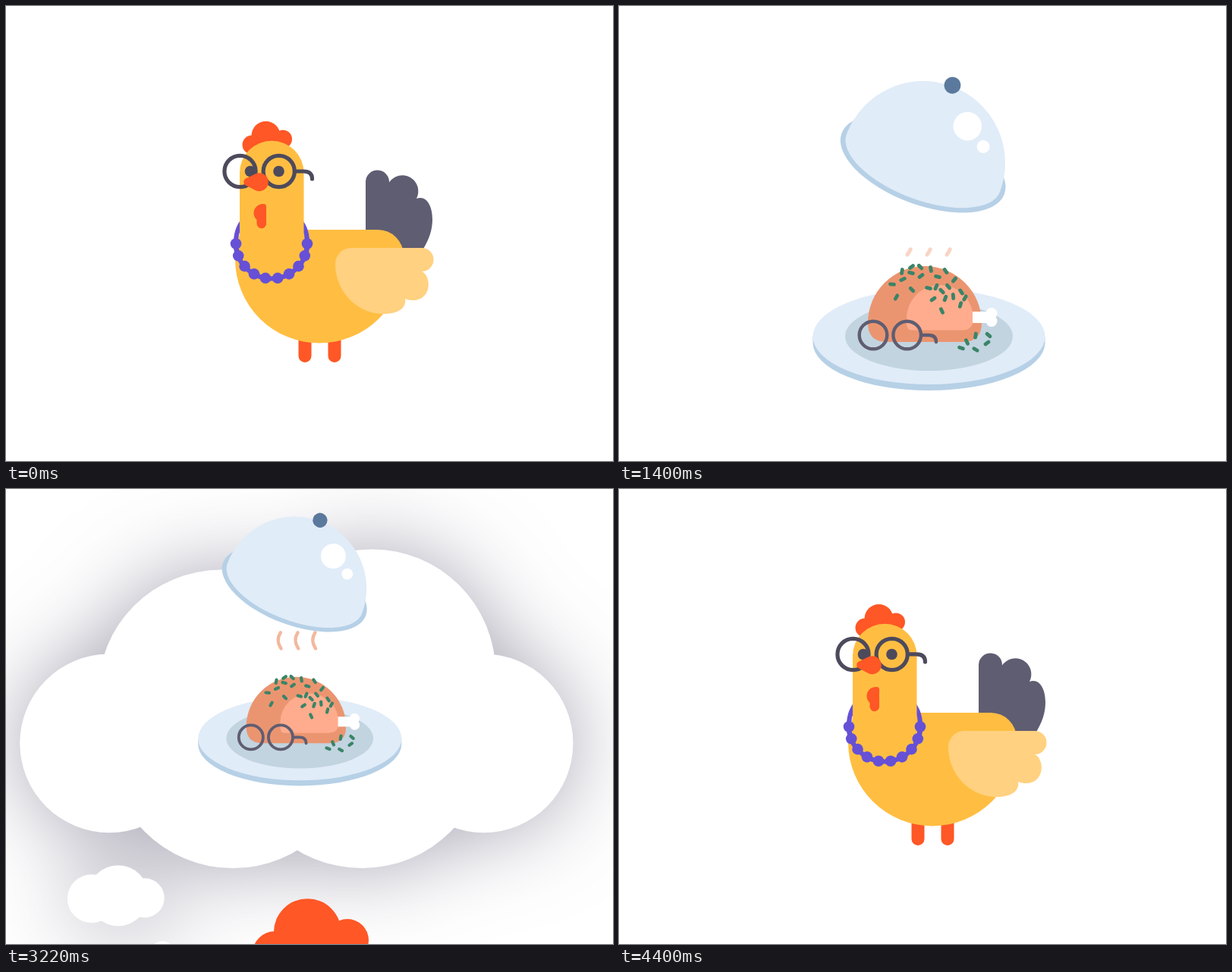
Recreate the animation shown at these times as an HTML page with a canvas. Size 800 by 600 pixels, loop 4840 ms.

```html
<!DOCTYPE html>
<html>
<head>
<meta charset="utf-8">
<style>
  html, body { margin: 0; width: 100%; height: 100%; overflow: hidden; background: #fff; }
  canvas { display: block; }
</style>
</head>
<body>
<canvas id="stage" width="800" height="600"></canvas>
<script>
const c = document.getElementById('stage').getContext('2d');
const LOOP = 4840, TAU = Math.PI * 2;
const ORANGE = '#ff5725', YELLOW = '#ffbe42', SLATE = '#5f5d72', FRAME = '#4d4a5c', PURPLE = '#6650d6';
const PALE = '#e0ecf8', BLUE = '#b6d0e6';

const clamp = v => Math.max(0, Math.min(1, v));
const span = (t, start, length) => clamp((t - start) / length);
const easeOut = p => 1 - (1 - p) ** 3;
const easeInOut = p => p < .5 ? 4 * p ** 3 : 1 - 4 * (1 - p) ** 3;
const sine = p => (1 - Math.cos(Math.PI * p)) / 2;

function fill(color, d) {
  c.fillStyle = color;
  c.fill(new Path2D(d));
}
function line(color, width, d) {
  c.strokeStyle = color;
  c.lineWidth = width;
  c.stroke(new Path2D(d));
}
function oval(color, x, y, rx, ry = rx) {
  c.fillStyle = color;
  c.beginPath();
  c.ellipse(x, y, rx, ry, 0, 0, TAU);
  c.fill();
}
function ring(color, width, x, y, r, end = TAU) {
  c.strokeStyle = color;
  c.lineWidth = width;
  c.beginPath();
  c.arc(x, y, r, 0, end);
  c.stroke();
}
function group(draw) {
  c.save();
  draw();
  c.restore();
}

function drawHen() {
  line(ORANGE, 17, 'M394 435V461.5M433 435V461.5');
  fill(SLATE, 'M474 322V231.5A15.5 15.5 0 0 1 505 232.5A21 21 0 0 1 541 254C553 249 562 262 562 281C562 295 558 307 549 322Z');
  fill(YELLOW, 'M308 295H490A34 34 0 0 1 524 329V334A111 110.5 0 0 1 302 334L308 300Z');
  fill('#ffd180', 'M455 319H548A15.5 15.5 0 0 1 548 350C557 354 560 371 553 380C546 390 533 389 526 386C528 396 520 406 498 406C462 406 434 376 434 340A21 21 0 0 1 455 319Z');
  oval(ORANGE, 342.5, 171, 19);
  oval(ORANGE, 324, 183, 12.5);
  oval(ORANGE, 365, 175.5, 12);
  ring(PURPLE, 6, 350, 311, 47);
  fill(YELLOW, 'M308 330V220A42.2 42.2 0 0 1 392.5 220V330A42.2 30 0 0 1 308 330Z');
  ring(PURPLE, 6, 350, 312, 47.5, Math.PI);
  for (let i = 0; i < 10; i++) {
    const a = (1.8 + i * 19.6) * TAU / 360;
    oval(PURPLE, 350 + 47 * Math.cos(a), 312 + 47.5 * Math.sin(a), 7.3);
  }
  fill(ORANGE, 'M343 264Q343 261 339 261A12 12 0 0 0 330.5 282V287A6.3 6.3 0 0 0 343 288Z');
  oval(FRAME, 322, 218, 7.3);
  oval(FRAME, 359.5, 218, 7.3);
  ring(FRAME, 5.2, 308.5, 218, 20.6);
  ring(FRAME, 5.2, 359.7, 218, 20.6);
  line(FRAME, 5.2, 'M382 218H392Q403.5 218 403.5 228');
  fill(ORANGE, 'M316 227.5L329 221.3A12 12 0 1 1 329 243.3L316 236.5A5 5 0 0 1 316 227.5Z');
}

// x, y, tilt in degrees
const HERBS = [
  373,350,100, 385.5,344,-35, 397,344,45, 411,347,80, 430.5,349.5,55, 442,361,-50,
  385,352,15, 398,356,-35, 420,357,15, 374,360.5,-25, 360,367,5, 386,374,45,
  365.5,384,-60, 408,372,15, 418,370.5,-65, 434,370,50, 425.5,376,45, 451,377,55,
  414,386.5,-35, 430,385.5,-70, 440.5,383,85, 456,385,-60, 450,394,-75, 425.5,402,65,
  470,434.5,-80, 487,434,40, 458.5,443,65, 485,444.5,-35, 470,453,30, 451,451,20];

function drawDish() {
  fill(BLUE, 'M255.5 436H561.5V444A153 63 0 0 1 255.5 444Z');
  oval(PALE, 408.5, 436, 153, 63);
  oval('#c2d4e0', 408.5, 435.5, 110.5, 45.5);
  fill('#eb9570', 'M328 418A75 75 0 0 1 478 418Q478 443 453 443H353Q328 443 328 418Z');
  fill('#ffac8e', 'M379 412A44 44 0 0 1 467 412Q467 427.5 452 427.5H386Q379 427.5 379 418Z');
  fill('#fff', 'M466 403H491V418H466Z');
  oval('#fff', 491, 405.5, 7.5);
  oval('#fff', 491, 415.5, 7.5);
  for (let i = 0; i < HERBS.length; i += 3) {
    const a = HERBS[i + 2] * TAU / 360, dx = 2.5 * Math.cos(a), dy = 2.5 * Math.sin(a);
    line('#3a8468', 4.8, `M${HERBS[i] - dx} ${HERBS[i + 1] - dy}l${2 * dx} ${2 * dy}`);
  }
  ring(SLATE, 4.4, 335, 434, 18.3);
  ring(SLATE, 4.4, 379.7, 434, 18.3);
  line(SLATE, 4.4, 'M399 434H408Q418 434 418 443');
}

function drawSteam(t) {
  const phase = ((t - 60) % 1240) / 1240;
  if (t < 60 || t > 3780) return;
  const length = 60, head = clamp(phase * 1.7), tail = clamp((phase - .15) / .8);
  c.lineCap = 'butt';
  c.globalAlpha = clamp(Math.min(phase * 6.5, (1 - phase) * 2));
  c.setLineDash([(head - tail) * length, 200]);
  c.lineDashOffset = -tail * length;
  c.lineCap = 'round';
  for (let i = 0; i < 3; i++) {
    line('#f2b093', 5, 'M380 328C390 315 384 306 380 300C374 291 374 283 382 273');
    c.translate(26, 0);
  }
}

function drawCloche(t) {
  const open = easeOut(span(t, 230, 1050)) * (1 - sine(span(t, 3154, 900)));
  const bob = t < 1280 ? 0 : 4.5 * (1 - Math.cos(TAU * (t - 1400) / 1840));
  c.translate(408 - 7 * open - 20 * open * (1 - open), 430 - 223 * open + bob * open);
  c.rotate(20.6 * open ** .7 * TAU / 360);
  oval(BLUE, 0, 1, 114.5, 54);
  fill(PALE, 'M-108 0A108 108 0 0 1 108 0A108 48.6 0 0 1 -108 0Z');
  oval('#5b799c', 0, -109.4, 11);
  oval('#fff', 37.5, -65.8, 18.8);
  oval('#fff', 66.5, -47.9, 8.5);
}

// x, y, radius of each puff
const PUFFS = [
  [122, 443, 134.5], [685, 443, 134.5], [517, 337, 186], [290, 367, 185], [308, 443, 188], [502, 442, 189],
  [95.4, 676.8, 36.5], [135.3, 672.3, 45.6], [175.2, 675.7, 29.6], [185.6, 759.8, 13.5], [202.2, 759.8, 19]];

function drawCloud(t, zoom) {
  const shade = span(t, 2160, 540);
  if (!shade) return;
  c.shadowColor = `rgba(95, 90, 114, ${.55 * shade})`;
  c.shadowBlur = 130 * zoom;
  c.fillStyle = '#fff';
  c.beginPath();
  for (const [x, y, r] of PUFFS) {
    c.moveTo(x + r, y);
    c.arc(x, y, r, 0, TAU);
  }
  c.fill();
}

function render(t) {
  c.setTransform(1, 0, 0, 1, 0, 0);
  c.fillStyle = '#fff';
  c.fillRect(0, 0, 800, 600);
  c.lineCap = 'round';

  const slide = 800 * easeInOut(span(t, 80, 420));
  if (slide < 800) group(() => { c.translate(-slide, 0); drawHen(); });

  const zoom = 1 - .625 * sine(span(t, 2964, 876));
  const pan = sine(span(t, 2848, 990));
  c.translate(400 - 65 * pan, 300 - 289.3 * pan);
  c.scale(zoom, zoom);
  c.translate(-400 + 800 - slide, -300);

  group(() => drawCloud(t, zoom));
  drawDish();
  group(() => drawSteam(t));
  group(() => drawCloche(t));

  const fade = span(t, 3840, 540);
  if (fade) group(() => {
    c.resetTransform();
    c.globalAlpha = fade;
    c.fillStyle = '#fff';
    c.fillRect(0, 0, 800, 600);
  });

  if (t > 2700) {
    c.translate(-493.3, 271.4);
    c.scale(8 / 3, 8 / 3);
    drawHen();
  }
}

const start = performance.now();
function tick() {
  render((performance.now() - start) % LOOP);
  requestAnimationFrame(tick);
}
tick();
</script>
</body>
</html>
```
